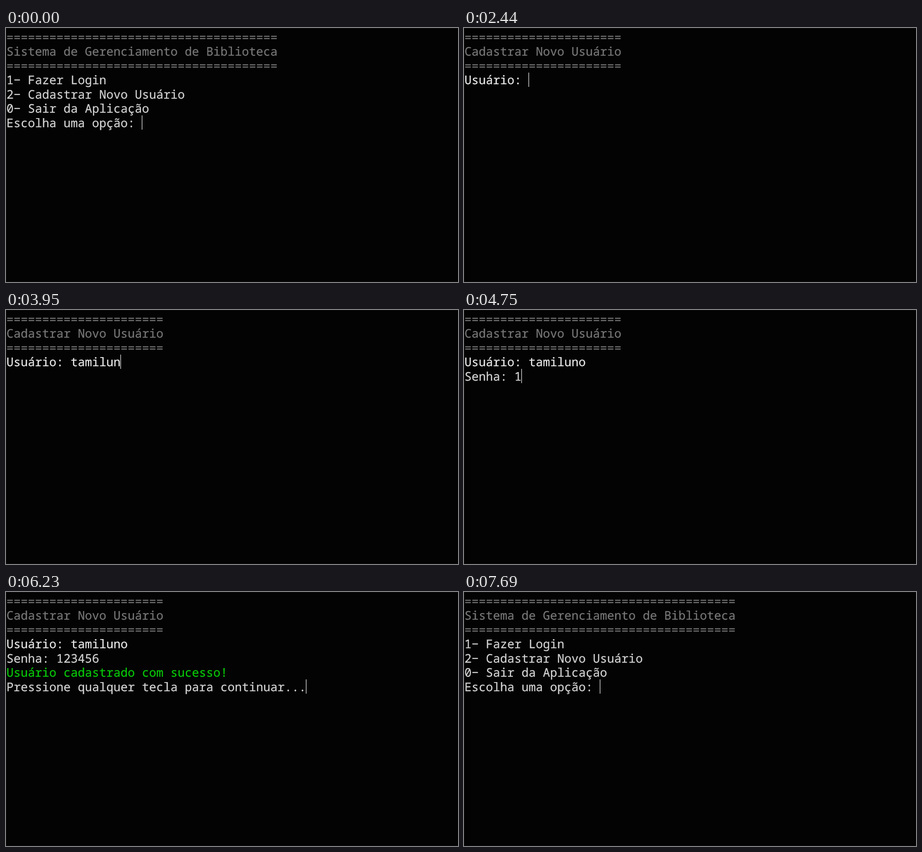
An HTML page for the animation above (8000 ms loop, 998 by 561 pixels).

```html
<!DOCTYPE html>
<html lang="pt-BR">
<head>
<meta charset="utf-8">
<title>Terminal</title>
<style>
  html, body { margin: 0; width: 100%; height: 100%; overflow: hidden; background: #030303; }
  svg { display: block; width: 998px; height: 561px; }
  text {
    font: 500 26.25px "Noto Sans Mono", "DejaVu Sans Mono", monospace;
    text-rendering: geometricPrecision;
    white-space: pre;
    color: #d2d2d2;
    fill: currentColor;
    stroke: currentColor;
    stroke-width: .3px;
  }
  .title { color: #767676; }
  .user { color: #e8e8e8; }
  .ok { color: #08c808; }
</style>
</head>
<body>
<svg viewBox="0 0 998 561">
  <path d="M0 .5H998M.5 0V561M0 560.5H998" stroke="#0e0e0e"/>
  <g id="screen"></g>
  <rect id="cursor" width="1.4" height="31.5" fill="#d8d8d8"/>
</svg>
<script>
const LOOP = 8000, CELL = 15.75, ROW = 31.5, LEFT = 1, TOP = 4.2, BASE = 25.3;
const screen = document.getElementById('screen');
const cursor = document.getElementById('cursor');

const USER = 'tamiluno', PASS = '123456';
const USER_KEYS = [3080, 3190, 3300, 3500, 3630, 3830, 3930, 4020];
const PASS_KEYS = [4750, 4880, 5060, 5400, 5580, 5760];
const CURSOR_OFF = [[340, 940], [1470, 1990], [2970, 3080], [6760, 7360]];

const typed = (word, keys, t) => word.slice(0, keys.filter(k => k <= t).length);

function heading(title) {
  const rule = '='.repeat(title.length);
  return [rule, title, rule];
}

function menu(answer) {
  return [
    ...heading('Sistema de Gerenciamento de Biblioteca'),
    '1− Fazer Login',
    '2− Cadastrar Novo Usuário',
    '0− Sair da Aplicação',
    'Escolha uma opção: ' + answer
  ];
}

function signup(t) {
  const lines = [...heading('Cadastrar Novo Usuário'), 'Usuário: ' + typed(USER, USER_KEYS, t)];
  if (t >= 4350) lines.push('Senha: ' + typed(PASS, PASS_KEYS, t));
  if (t >= 6230) lines.push('Usuário cadastrado com sucesso!', 'Pressione qualquer tecla para continuar...');
  return lines;
}

function linesAt(t) {
  if (t >= 2440 && t < 7690) return signup(t);
  return menu(t >= 2190 && t < 2440 ? '2' : '');
}

function styleOf(line, row) {
  if (row < 3) return 'title';
  if (line.startsWith('Usuário:')) return 'user';
  return line.endsWith('!') ? 'ok' : '';
}

function lineNode(line, row) {
  const node = document.createElementNS('http://www.w3.org/2000/svg', 'text');
  node.setAttribute('x', LEFT);
  node.setAttribute('y', TOP + row * ROW + BASE);
  node.setAttribute('class', styleOf(line, row));
  node.textContent = line;
  return node;
}

let shown = '';
function draw(t) {
  const lines = linesAt(t), key = lines.join('\n');
  if (key !== shown) {
    screen.replaceChildren(...lines.map(lineNode));
    shown = key;
  }
  const last = lines.length - 1;
  cursor.setAttribute('x', LEFT - 0.5 + lines[last].length * CELL);
  cursor.setAttribute('y', TOP - 0.2 + last * ROW);
  const off = CURSOR_OFF.some(([from, to]) => t >= from && t < to);
  cursor.setAttribute('visibility', off ? 'hidden' : 'visible');
}

const start = performance.now();
function tick() {
  draw((performance.now() - start) % LOOP);
  requestAnimationFrame(tick);
}
tick();
</script>
</body>
</html>
```
